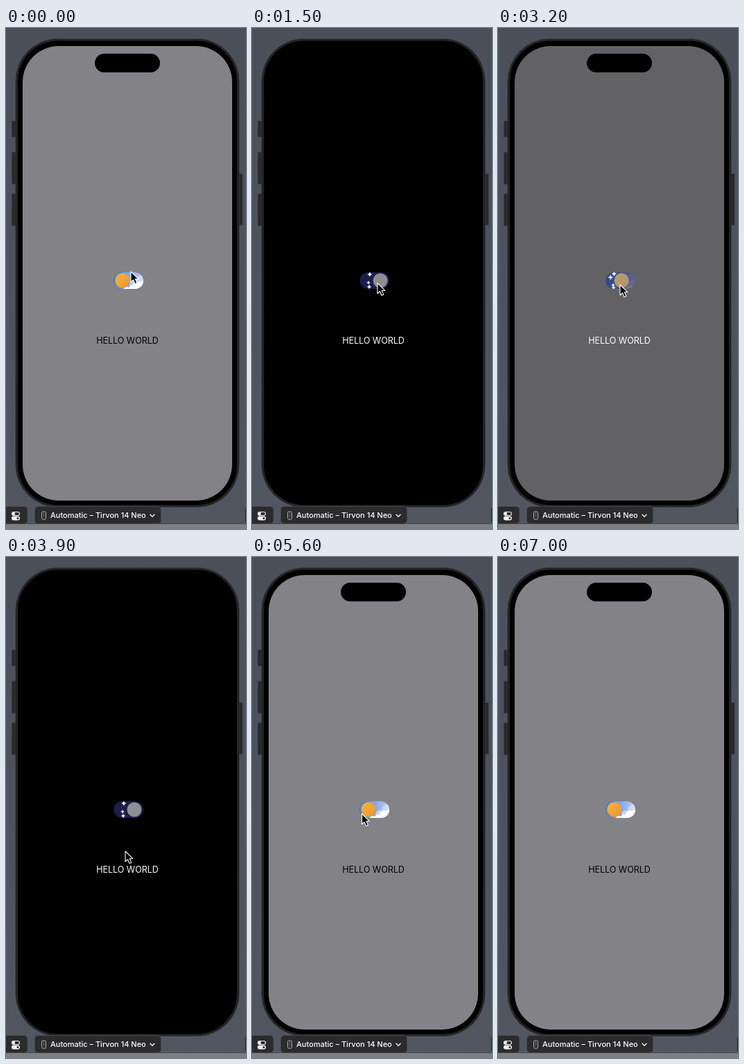
Recreate the animation shown at these times as an HTML page. Size 346 by 722 pixels, loop 7600 ms.

```html
<!DOCTYPE html>
<html lang="en">
<head>
<meta charset="utf-8">
<title>Day and night switch</title>
<style>
  html, body { margin: 0; width: 100%; height: 100%; overflow: hidden; background: #4c505b; }
  svg { display: block; width: 346px; height: 722px; }
  text { font-family: Inter, Roboto, sans-serif; }
</style>
</head>
<body>
<svg viewBox="0 0 346 722">
  <defs>
    <linearGradient id="wall" x2="0" y2="1"><stop stop-color="#4b4f5a"/><stop offset="1" stop-color="#515660"/></linearGradient>
    <linearGradient id="sky"><stop stop-color="#4b87ee"/><stop offset=".5" stop-color="#7ba7f3"/><stop offset="1" stop-color="#c6d0f2"/></linearGradient>
    <linearGradient id="sun" x2="1" y2="1"><stop stop-color="#f3b73c"/><stop offset="1" stop-color="#f0932c"/></linearGradient>
    <clipPath id="capsule"><rect x="155.5" y="352" width="42.5" height="24" rx="12"/></clipPath>
    <path id="star" d="M0-3.2Q.4-.4 3.2 0Q.4.4 0 3.2Q-.4.4-3.2 0Q-.4-.4 0-3.2Z" fill="#fff" stroke="#fff" stroke-width=".4"/>
  </defs>

  <rect width="346" height="722" fill="url(#wall)"/>
  <g fill="#29292b" stroke="#3b3c40" stroke-width=".6">
    <rect x="8.5" y="134" width="6" height="23" rx="1"/>
    <rect x="8.5" y="179" width="6" height="46" rx="1"/>
    <rect x="8.5" y="239" width="6" height="46" rx="1"/>
    <rect x="335" y="210" width="6" height="74" rx="1"/>
  </g>
  <rect x="14" y="15.5" width="322" height="675" rx="61" fill="#000" stroke="#39393b"/>
  <rect x="15.8" y="17.3" width="318.4" height="671.4" rx="59" fill="none" stroke="#252526" stroke-width="2.6"/>
  <rect id="screen" x="24" y="26" width="302" height="655" rx="52"/>
  <rect x="128" y="37" width="94" height="27" rx="13.5"/>

  <g clip-path="url(#capsule)">
    <rect x="155" y="352" width="43" height="24" fill="#1c1d4b"/>
    <g id="day">
      <rect x="155" y="352" width="43" height="24" fill="url(#sky)"/>
      <g id="cloud" fill="#fff">
        <g fill="#dce4fa" opacity=".7"><circle cx="184" cy="371" r="6"/><circle cx="195" cy="365" r="8"/></g>
        <circle cx="174" cy="378" r="5"/><circle cx="182" cy="376" r="5"/>
        <circle cx="190" cy="372" r="6.5"/><circle cx="198" cy="370" r="6"/>
      </g>
    </g>
    <g id="stars"></g>
    <g id="knob">
      <circle cy="364" r="10.5" fill="#8f8f91"/>
      <circle id="sunFace" cy="364" r="10.5" fill="url(#sun)"/>
    </g>
  </g>
  <text id="hello" x="175" y="455" font-size="12.5" text-anchor="middle">HELLO WORLD</text>

  <rect y="715" width="346" height="7" fill="#7f7e83"/>
  <path d="M0 714.5H346" stroke="#48494f"/>
  <g fill="#2b2b2d" stroke="#48484b">
    <rect x="-10" y="689.5" width="41" height="25" rx="5"/>
    <rect x="41.5" y="689.5" width="182" height="25" rx="5"/>
    <rect x="344.5" y="689.5" width="20" height="25" rx="5"/>
  </g>
  <g fill="none" stroke="#eee" stroke-width="1.1">
    <rect x="8.5" y="697.5" width="11" height="5" rx="2.5"/>
    <rect x="8.5" y="704" width="11" height="5" rx="2.5" fill="#eee"/>
    <circle cx="11" cy="700" r="1.6" fill="#eee"/>
    <circle cx="17" cy="706.5" r="1.5" fill="#2b2b2d" stroke="none"/>
    <rect x="51.5" y="697" width="6" height="11" rx="1.3" stroke="#aaa" stroke-width="1"/>
    <path d="M53.2 699H55.8M53.2 701.5H55.8M53.2 704H55.8" stroke="#888" stroke-width=".8"/>
    <path d="M208 701.3L211 704.3L214 701.3" stroke-width="1.5" stroke-linecap="round"/>
  </g>
  <text x="64" y="706.3" font-size="11" font-weight="500" fill="#fff">Automatic – Tirvon 14 Neo</text>

  <path id="pointer" d="M0 0V15L3.5 11.8L6 17.6L8.8 16.4L6.3 10.8H11Z" fill="#000" stroke="#fff" stroke-width="1.1" stroke-linejoin="round"/>
</svg>
<script>
const LOOP = 7600, STEP = 100;
const clicks = [730, 2130, 3030, 4430, 5630, 6420];   // alternately to night and to day
const trail = [                                      // time, x, y
  [0, 180, 351], [700, 180, 366], [1000, 180, 366], [2100, 182, 370],
  [2300, 185, 391], [2600, 185, 393], [2900, 177, 370], [3200, 176, 370],
  [3500, 172, 424], [4100, 172, 424], [4400, 162, 370], [5200, 162, 370],
  [5700, 158, 370], [6500, 156, 370], [6900, 156, 370]
];
const starShapes = [                                 // night x, y, drift by day, scale
  [169.8, 355, -6, -2, 1], [168, 367, -5, 9, .8], [169, 373, -6, 3, .9], [163, 367, -2, -19, 1]
];

const $ = id => document.getElementById(id);
const clamp = v => Math.max(0, Math.min(1, v));
const mix = (a, b, p) => a + (b - a) * p;
const smooth = p => p * p * (3 - 2 * p);
const move = (el, x, y, s = 1) => el.setAttribute('transform', `translate(${x} ${y}) scale(${s})`);

$('stars').innerHTML = starShapes.map(() => '<use href="#star"/>').join('');
const stars = [...$('stars').children];

function pointerAt(t) {
  const i = Math.max(1, trail.findIndex(p => p[0] > t));
  const [t0, x0, y0] = trail[i - 1], [t1, x1, y1] = trail[i];
  const p = smooth(clamp((t - t0) / (t1 - t0)));
  return [mix(x0, x1, p), mix(y0, y1, p)];
}

function draw(time) {
  const t = Math.floor(time % LOOP / STEP) * STEP;
  const past = clicks.filter(c => c <= t);
  const night = past.length % 2 === 1;
  const age = past.length ? t - past[past.length - 1] : LOOP;
  const turn = smooth(clamp(age / 300)), fade = clamp((age - 80) / 360);
  const dark = night ? turn : 1 - turn;
  const light = night ? 1 - fade : fade;

  $('screen').setAttribute('fill', `rgb(${[131, 130, 135].map(c => Math.round(c * light))})`);
  $('hello').setAttribute('fill', night ? '#fff' : '#000');
  $('day').setAttribute('opacity', 1 - dark);
  move($('cloud'), 0, dark * 10);
  move($('knob'), mix(168, 185, dark), 0);
  $('sunFace').setAttribute('opacity', 1 - dark);

  starShapes.forEach(([x, y, dx, dy, size], i) => {
    const day = 1 - dark;
    move(stars[i], x + dx * day, y + dy * day, size);
    stars[i].setAttribute('opacity', i < 3 ? clamp(dark * 2.5) : clamp(6 * dark * day));
  });

  const visible = t < 6900;
  $('pointer').setAttribute('visibility', visible ? 'visible' : 'hidden');
  if (visible) move($('pointer'), ...pointerAt(t));
}

const start = performance.now();
function tick() {
  draw(performance.now() - start);
  requestAnimationFrame(tick);
}
tick();
</script>
</body>
</html>
```
